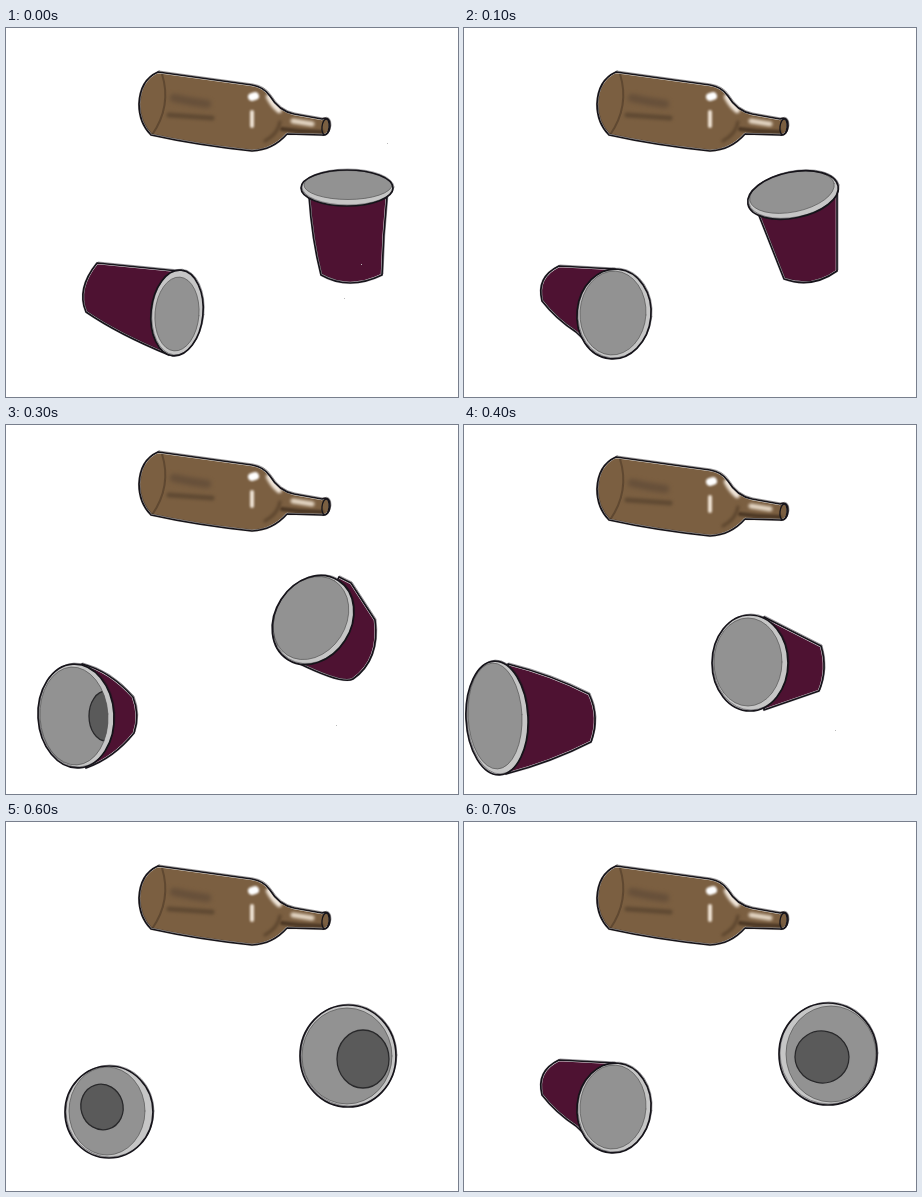
Recreate the animation shown at these times as an HTML page with a canvas. Size 452 by 369 pixels, loop 900 ms.

```html
<!DOCTYPE html>
<html>
<head>
<meta charset="utf-8">
<style>
html, body { margin: 0; width: 100%; height: 100%; overflow: hidden; background: #fff; }
canvas { display: block; }
</style>
</head>
<body>
<canvas id="stage" width="452" height="369"></canvas>
<script>
const ctx = document.getElementById('stage').getContext('2d');
const INK = '#16141a', PURPLE = '#4e1232', RIM = '#c6c6c6', GREY = '#929292', HOLE = '#5a5a5a';
const BROWN = '#7b5f41', DARK = '#5f4831';

// Ellipses are [cx, cy, rx, ry, rotation].
const left = {
  side: { body: 'M172 243L91 235Q70 261 80 284Q112 306 163 327Z',
          rim: [171, 285, 26, 43, .1], inside: [171, 286, 22, 37, .08] },
  turn: { body: 'M150 241L95 238Q72 249 78 273Q92 291 112 304L136 327Z',
          rim: [150, 286, 37, 45, .1], inside: [149, 285, 33, 42, .06] },
  front: { rim: [103, 290, 44, 46, 0], inside: [101, 289, 38, 44, 0], hole: [96, 285, 21, 23, -.3] },
  back: { body: 'M76 239Q104 246 127 272Q134 290 128 308Q108 333 80 343Z',
          rim: [70, 291, 38, 52, -.06], inside: [68, 291, 34, 49, -.06], hole: [100, 291, 17, 25, 0] },
  away: { body: 'M44 239Q88 250 125 269Q136 292 127 317Q88 337 42 349Z',
          rim: [33, 293, 31, 57, -.05], inside: [31, 291, 27, 53, -.05] }
};
const L = [left.side, left.turn, left.front, left.back, left.away, left.back, left.front, left.turn];
const R = [
  { body: 'M303 168Q306 212 315 247Q343 263 376 247Q377 208 381 168Z',
    rim: [341, 160, 46, 18, 0], inside: [342, 157, 44, 14.5, 0] },
  { body: 'M292 180L320 251Q348 261 373 243L373 160Z',
    rim: [329, 167, 46, 23, -.2], inside: [328, 164, 43, 20, -.2] },
  { body: 'M284 202L324 252Q350 259 369 238Q367 198 358 164Z',
    rim: [317, 175, 45, 29, -.35], inside: [315, 173, 42, 26.5, -.35] },
  { body: 'M333 152L345 158L369 195Q374 235 347 254Q337 260 292 238Z',
    rim: [307, 195, 47, 38, -1], inside: [305, 193, 44, 35, -1] },
  { body: 'M300 192L357 221Q364 244 355 266L300 285Z',
    rim: [286, 238, 38, 48, 0], inside: [284, 237, 34, 44, 0] },
  { body: 'M340 188Q362 195 375 211Q381 240 371 268L330 285Z',
    rim: [318, 235, 48, 51, 0], inside: [316, 235, 44, 48, 0], hole: [352, 240, 23, 32, 0] },
  { rim: [342, 234, 48, 51, 0], inside: [341, 234, 45, 48, 0], hole: [357, 237, 26, 29, 0] },
  { rim: [364, 232, 49, 51, 0], inside: [367, 232, 45, 48, 0], hole: [358, 235, 27, 26, .2] }
];
const lift = [0, 0, 12, 17, 12, 0, 0, 0];
const specks = [
  [[381, 115], [338, 270], [355, 236]], [], [[339, 271], [347, 233]], [[330, 300]],
  [[371, 305]], [[414, 243], [431, 303]], [], []
];

const oval = ([x, y, rx, ry, a]) => {
  const p = new Path2D();
  p.ellipse(x, y, rx, ry, a, 0, 7);
  return p;
};

function fill(path, color) {
  ctx.fillStyle = color;
  ctx.fill(path);
}

function line(path, width = 1.5, color = INK) {
  ctx.lineWidth = width;
  ctx.strokeStyle = color;
  ctx.stroke(path);
}

// Main outline plus a thin second pass slightly out of register.
function sketch(path) {
  line(path, 1.7);
  ctx.save();
  ctx.translate(1, -1);
  line(path, .6, 'rgba(22,20,26,.65)');
  ctx.restore();
}

function cup({ body, rim, inside, hole }) {
  if (body) {
    const p = new Path2D(body);
    fill(p, PURPLE);
    line(p, 2.6, '#e6e2e6');
    sketch(p);
  }
  const mouth = oval(inside);
  fill(oval(rim), RIM);
  fill(mouth, GREY);
  if (hole) {
    ctx.save();
    ctx.clip(mouth);
    fill(oval(hole), HOLE);
    line(oval(hole), 1.3, '#29292b');
    ctx.restore();
  }
  line(mouth, .7, '#555');
  sketch(oval(rim));
}

function smear(d, width, color, blur) {
  ctx.filter = `blur(${blur}px)`;
  line(new Path2D(d), width, color);
  ctx.filter = 'none';
}

function bottle() {
  const p = new Path2D('M152 44L246 57Q258 59 264 68Q273 83 288 86L316 91Q324 88 324 98Q323 108 316 107' +
    'L281 106Q267 122 246 123Q190 117 145 107Q133 95 133 76Q134 52 152 44Z');
  fill(p, BROWN);
  ctx.save();
  ctx.clip(p);
  smear('M156 46Q166 78 146 107', 2, DARK, .7);
  smear('M168 70Q185 74 201 76', 8, '#67503a', 2);
  smear('M163 87L206 90', 5, '#604a33', 1.5);
  smear('M276 101Q296 104 316 104', 4, '#4c3825', 1.2);
  smear('M259 113Q272 106 274 94', 3, '#5b442d', 1.5);
  smear('M246 69L249 68', 8, '#fff', 1.2);
  smear('M246 84L246 98', 4, '#eee2d4', 1.2);
  smear('M263 69Q267 77 273 82', 6, '#f2e8dc', 1.5);
  smear('M287 93L306 96', 5, '#e4d6c4', 1.5);
  ctx.restore();
  line(p, 2.4, '#e8e4de');
  sketch(p);
  line(oval([319.5, 99, 3.5, 8, .1]), 1.3);
}

function draw(now) {
  const i = Math.min(7, Math.floor(now % 900 / 100));
  ctx.fillStyle = '#fff';
  ctx.fillRect(0, 0, 452, 369);
  ctx.lineCap = ctx.lineJoin = 'round';
  ctx.save();
  ctx.translate(0, -lift[i]);
  bottle();
  ctx.restore();
  cup(L[i]);
  cup(R[i]);
  ctx.fillStyle = '#bbb';
  for (const [x, y] of specks[i]) ctx.fillRect(x, y, 1, 1);
}

function loop() {
  draw(performance.now());
  requestAnimationFrame(loop);
}
loop();
</script>
</body>
</html>
```
